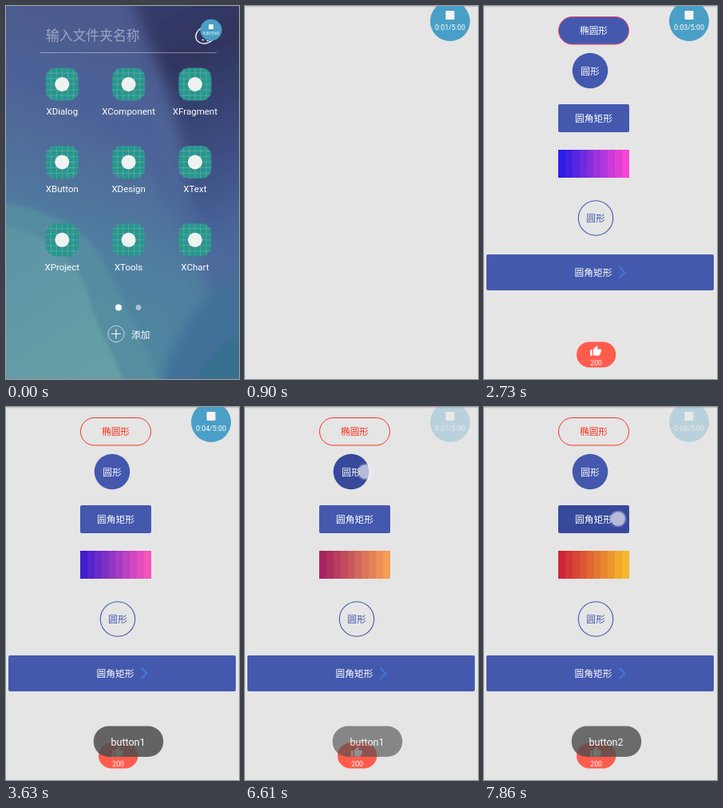
Write an HTML page that moves like this. It is 292x467 px and loops after 8 s.

```html
<!DOCTYPE html>
<html lang="zh">
<head>
<meta charset="utf-8">
<title>Button demo</title>
<style>
  html, body { margin: 0; width: 100%; height: 100%; overflow: hidden; background: #e5e5e5; }
  svg { display: block; width: 100vw; height: 100vh; }
  text { font-family: Roboto, "Noto Sans CJK SC", "Noto Sans CJK", sans-serif; fill: #fff; }
  .mid { text-anchor: middle; }
  .cjk { font-size: 11.7px; text-anchor: middle; }
</style>
</head>
<body>
<svg viewBox="0 0 292 467" xmlns="http://www.w3.org/2000/svg">
  <defs>
    <linearGradient id="sky" x1="0.2" y1="0" x2="0" y2="1">
      <stop offset="0" stop-color="#4c5a8e"/>
      <stop offset="0.3" stop-color="#4f6799"/>
      <stop offset="0.6" stop-color="#507fa0"/>
      <stop offset="1" stop-color="#4f8e9f"/>
    </linearGradient>
    <linearGradient id="night" x1="0" y1="0" x2="0.25" y2="1">
      <stop offset="0" stop-color="#383f70"/>
      <stop offset="0.35" stop-color="#2f355e"/>
      <stop offset="0.75" stop-color="#3f5086"/>
      <stop offset="1" stop-color="#48679a"/>
    </linearGradient>
    <linearGradient id="sea" x1="0" y1="0" x2="0.5" y2="1">
      <stop offset="0" stop-color="#5a93a6"/>
      <stop offset="1" stop-color="#659fa5"/>
    </linearGradient>
    <linearGradient id="bands"></linearGradient>
    <filter id="soft" x="-30%" y="-30%" width="160%" height="160%"><feGaussianBlur stdDeviation="9"/></filter>
    <filter id="edge" x="-20%" y="-20%" width="140%" height="140%"><feGaussianBlur stdDeviation="2.5"/></filter>
    <g id="tile">
      <rect x="-20.5" y="-20.5" width="41" height="41" rx="13" fill="#2a958d"/>
      <path id="mesh" fill="none" stroke="#8fd0c8" stroke-width="0.5" opacity="0.65"/>
      <circle r="9" fill="#eef2f1"/>
    </g>
  </defs>

  <g id="home">
    <rect width="292" height="467" fill="url(#sky)"/>
    <g filter="url(#soft)">
      <path d="M150 -30C180 60 215 110 222 190S250 300 330 330V-30Z" fill="url(#night)"/>
      <path d="M0 95C70 110 150 150 205 250S250 400 320 420V330C250 300 215 240 200 180S110 60 0 60Z" fill="#4a629a" opacity="0.6"/>
      <path d="M190 500C200 420 245 350 320 320V500Z" fill="#3f7098"/>
    </g>
    <g filter="url(#edge)">
      <path d="M-10 246C50 250 105 280 128 330S175 420 196 480H-10Z" fill="#5791a2" opacity="0.75"/>
      <path d="M-10 276C50 280 92 320 104 365S140 440 150 480H-10Z" fill="url(#sea)"/>
      <path d="M238 480C246 445 268 420 300 408V480Z" fill="#397090"/>
    </g>
    <text x="50" y="43" font-size="16.8" opacity="0.45">输入文件夹名称</text>
    <path d="M42 58.5H264" stroke="#fff" opacity="0.38"/>
    <g fill="none" stroke="#fff" stroke-width="1.5" opacity="0.9">
      <ellipse cx="250" cy="36.5" rx="12.5" ry="10" transform="rotate(-25 250 36.5)"/>
      <path d="M246 42.5h1.5M252 43.5h1.5M257 40.5h1.5" stroke-linecap="round"/>
    </g>
    <g id="apps"></g>
    <circle cx="141" cy="377.5" r="4" fill="#fff"/>
    <circle cx="166" cy="377.5" r="3.4" fill="#fff" opacity="0.5"/>
    <circle cx="138" cy="410.5" r="10.2" fill="none" stroke="#fff" stroke-width="0.8" opacity="0.8"/>
    <path d="M132 410.5h12M138 404.5v12" stroke="#fff" stroke-width="1.1"/>
    <text x="157" y="415.5" font-size="11.7">添加</text>
  </g>

  <g id="page">
    <rect width="292" height="467" fill="#e5e5e5"/>
    <rect width="292" height="1.4" fill="#c6c6c6"/>
    <g id="content">
      <rect id="pill" x="93.5" y="13.5" width="88" height="34.5" rx="17.2"/>
      <text id="pillText" class="cjk" x="137.5" y="35.3">椭圆形</text>
      <circle id="disc" cx="133" cy="81" r="22.3"/>
      <text class="cjk" x="133" y="85.8">圆形</text>
      <rect id="box" x="93" y="123" width="89" height="35" rx="2"/>
      <text class="cjk" x="137.5" y="145">圆角矩形</text>
      <rect x="93" y="180" width="89" height="35" fill="url(#bands)"/>
      <circle cx="140" cy="265.5" r="21.7" fill="none" stroke="#4459ae" stroke-width="1.1"/>
      <text class="cjk" x="140" y="270" style="fill:#4459ae">圆形</text>
      <rect x="3" y="311" width="285" height="45" rx="2" fill="#4459ae"/>
      <text class="cjk" x="137" y="338">圆角矩形</text>
      <path d="M169.5 326.5l6.8 7-6.8 7" fill="none" stroke="#3f78d8" stroke-width="2"/>
      <rect x="116" y="420.5" width="49.3" height="32" rx="16" fill="#ff5c4d"/>
      <path transform="translate(132.5 424.5) scale(.63)" fill="#fff" d="M1 21h4V9H1v12zm22-11c0-1.1-.9-2-2-2h-6.3l1-4.6v-.3c0-.4-.2-.8-.5-1.1L14.2 1 7.6 7.6C7.2 8 7 8.500 7 9v10c0 1.100.9 2 2 2h9c.8 0 1.500-.5 1.800-1.200l3-7c.1-.3.2-.5.2-.8z"/>
      <text class="mid" x="140.700" y="449.800" font-size="8.700">200</text>
    </g>
    <g id="toast">
      <rect x="109.700" y="399.500" width="87.500" height="38.500" rx="19" fill="#4d4d4d" opacity="0.85"/>
      <text id="toastText" class="mid" x="153" y="423.700" font-size="12.500"></text>
    </g>
  </g>

  <g id="touch">
    <circle r="10.500" fill="#fff" opacity="0.25"/>
    <circle r="8.800" fill="#e8eaf2" opacity="0.6"/>
  </g>

  <g id="bubble">
    <circle r="25" fill="#4a9fc6"/>
    <rect x="-5.500" y="-13" width="11" height="11" rx="1" fill="#f4f4f4"/>
    <text id="clock" class="mid" y="11" font-size="8.900"></text>
  </g>
</svg>
<script>
const LOOP = 8000, BANDS = 10;
const BLUE = '#4459ae', PRESSED = '#37499a', RED = '#f5321f';
const $ = id => document.getElementById(id);
const clamp = v => Math.max(0, Math.min(1, v));
const ramp = (t, from, to) => clamp((t - from) / (to - from));
const mix = (a, b, k) => a + (b - a) * k;
const mixColor = (a, b, k) => a.map((v, i) => mix(v, b[i], k));
const set = (id, attrs) => {
  for (const k in attrs) $(id).setAttribute(k, attrs[k]);
};
const show = (id, on) => set(id, { display: on ? 'inline' : 'none' });

// Launcher grid
const names = ['XDialog', 'XComponent', 'XFragment', 'XButton', 'XDesign', 'XText', 'XProject', 'XTools', 'XChart'];
$('apps').innerHTML = names.map((name, i) => {
  const x = 70.3 + (i % 3) * 83.3, y = 98 + Math.floor(i / 3) * 97.4;
  return `<use href="#tile" x="${x}" y="${y}"/>
    <text class="mid" x="${x}" y="${y + 38}" font-size="11.5">${name}</text>`;
}).join('');
let mesh = '';
for (let p = -14; p <= 14; p += 7) mesh += `M${p} -20V20M-20 ${p}H20`;
set('mesh', { d: mesh });

// Gradient strip: two hard stops per band
$('bands').innerHTML = Array.from({ length: BANDS }, (_, i) =>
  `<stop offset="${i / BANDS}"/><stop offset="${(i + 1) / BANDS}"/>`).join('');
const stops = [...$('bands').children];

function paintBands(t) {
  const k = (1 - Math.cos(Math.PI * ramp(t, 700, 10700))) / 2;
  const left = mixColor([20, 28, 252], [250, 40, 10], k);
  const right = mixColor([248, 52, 236], [244, 214, 0], k);
  stops.forEach((stop, i) => {
    const c = mixColor(left, right, Math.floor(i / 2) / (BANDS - 1)).map(Math.round);
    stop.setAttribute('stop-color', `rgb(${c})`);
  });
}

const touches = [
  { from: 600, to: 900, x: 73, y: 200 },
  { from: 2800, to: 3240, x: 151, y: 32 },
  { from: 6480, to: 6850, x: 151, y: 81 },
  { from: 7600, to: LOOP, x: 168, y: 140 }
];

function draw(t) {
  show('home', t < 900);
  show('page', t >= 900);
  show('content', t >= 1200);
  paintBands(t);

  const checked = t >= 2800;
  set('pill', { fill: checked ? 'none' : BLUE, stroke: checked ? RED : '#f0476b' });
  $('pillText').style.fill = checked ? RED : '#fff';
  $('pillText').style.fontWeight = checked ? 500 : 400;

  const hit = touches.find(p => t >= p.from && t < p.to);
  show('touch', hit);
  if (hit) set('touch', { transform: `translate(${hit.x} ${hit.y})`, opacity: ramp(t, hit.from - 40, hit.from + 80) });
  set('disc', { fill: hit === touches[2] ? PRESSED : BLUE });
  set('box', { fill: hit === touches[3] ? PRESSED : BLUE });

  const second = t >= 7000;
  $('toastText').textContent = second ? 'button2' : 'button1';
  set('toast', { opacity: second ? ramp(t, 7540, 7880) : ramp(t, 3350, 3625) * (1 - ramp(t, 6520, 6850)) });

  const grow = ramp(t, 100, 600);
  set('bubble', {
    transform: `translate(257 ${mix(30, 19, grow)}) scale(${mix(0.54, 1, grow)})`,
    opacity: mix(1, 0.28, ramp(t, 4100, 6300))
  });
  $('clock').textContent = `0:0${Math.floor(t / 1000 + 0.5)}/5:00`;
}

const start = performance.now();
function tick() {
  draw((performance.now() - start) % LOOP);
  requestAnimationFrame(tick);
}
tick();
</script>
</body>
</html>
```
